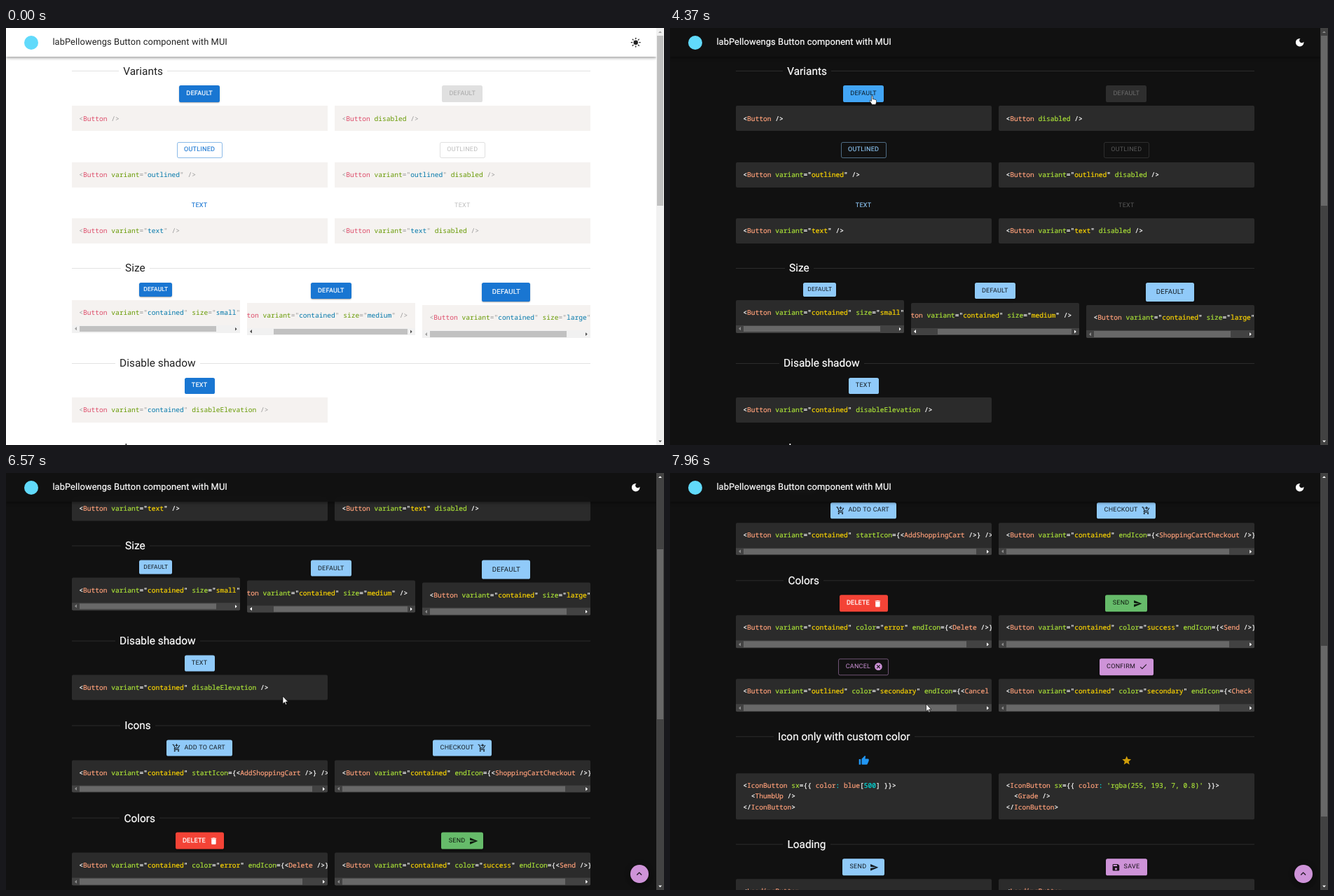
Animation of 939x596 px, one loop 8 s. Source, as an HTML page:

```html
<!DOCTYPE html>
<html lang="en">
<head>
<meta charset="utf-8">
<title>Button component</title>
<style>
html, body { margin: 0; width: 100%; height: 100%; overflow: hidden; }
body { position: relative; font-family: Roboto, Arial, sans-serif; text-rendering: geometricPrecision; }
#app {
  --bg: #fff; --fg: rgba(0,0,0,.87); --line: rgba(0,0,0,.115); --code: #f5f2f0; --head: #fff;
  --p: #999; --t: #dd4a68; --a: #690; --v: #07a; --radius: 0;
  position: absolute; inset: 0; overflow: hidden; background: var(--bg); color: var(--fg);
}
#app.dark {
  --bg: #111; --fg: #fff; --line: rgba(255,255,255,.115); --code: #2b2b2b; --head: rgba(17,17,17,.94);
  --p: #fefefe; --t: #ffa07a; --a: #abe338; --v: #ffd700; --radius: 2px;
  -webkit-text-stroke: .2px;
}
.bars { --track: #f1f1f1; --thumb: #c1c1c1; --on: #505050; --off: #a3a3a3; --hover: #a8a8a8; }
.bars.dim { --track: #424242; --thumb: #686868; --on: #fff; --off: #8b8b8b; --hover: #7b7b7b; }
#page, #page > *, .code > *, .bar > *, header, header > *, #side, #side > *, #fab, #cursor { position: absolute; }
#page { inset: 0; }
svg { display: block; fill: currentColor; flex: none; overflow: visible; }

header {
  left: 0; top: 0; width: 928px; height: 41px; background: var(--head); backdrop-filter: blur(5px);
  box-shadow: 0 1.3px 2.6px -.6px rgba(0,0,0,.2), 0 2.6px 3.2px rgba(0,0,0,.14), 0 .6px 6.4px rgba(0,0,0,.12);
}
.logo { left: 26px; top: 11px; width: 20px; height: 20px; border-radius: 50%; background: #61dafb; }
h1 { margin: 0; left: 66.4px; top: 0; font: 400 12.85px/41px Roboto, Arial, sans-serif; letter-spacing: .0075em; white-space: nowrap; }
#mode { left: 891.3px; top: 12.7px; }
#ripple { left: 886px; top: 7.6px; width: 26px; height: 26px; border-radius: 50%; background: #000; }

.head { left: 94px; width: 740px; height: 20px; display: flex; align-items: center; font-size: 15.42px; white-space: nowrap; }
.head::before, .head::after { content: ""; height: 1px; background: var(--line); width: 10%; }
.head::after { width: 90%; }
.head span { padding: 0 6.2px; }

.code { background: var(--code); border-radius: var(--radius); overflow: hidden; }
pre { margin: 0; top: 10.3px; font: 9.58px/15.4px "Noto Sans Mono", "DejaVu Sans Mono", monospace; color: var(--t); }
.p { color: var(--p); } .a, .s { color: var(--a); } .v { color: var(--v); } .n { color: #00e0e0; }
.bar { left: 0; bottom: 0; width: 100%; height: 10.9px; background: var(--track); }
.thumb { background: var(--thumb); }
.bar .thumb { top: 1.3px; height: 8.3px; }
.thumb.hot { background: var(--hover); }
.arrow { width: 3px; height: 5.4px; background: var(--on); clip-path: polygon(0 0, 100% 50%, 0 100%); }
.arrow.off { background: var(--off); }

.btn { box-sizing: border-box; display: flex; align-items: center; justify-content: center; border-radius: 2.6px;
  letter-spacing: .02857em; white-space: nowrap; -webkit-text-stroke: 0; }
.btn svg { margin: 0 -2.6px 0 5.1px; }
.btn svg:first-child { margin: 0 5.1px 0 -2.6px; }
.up { box-shadow: 0 1.9px .6px -1.3px rgba(0,0,0,.2), 0 1.3px 1.3px rgba(0,0,0,.14), 0 .6px 3.2px rgba(0,0,0,.12); }
.pri { background: var(--pri); color: var(--ink); -webkit-text-stroke: var(--bold); }
.hov { background: var(--priHover); }
.out { border: 1px solid var(--edge); color: var(--pri); background: var(--outHover); }
.txt { color: var(--pri); }
.out, .txt { -webkit-text-stroke: .12px; }
.dis { color: var(--disInk); }
.disBg { background: var(--disBg); }
.disEdge { border: 1px solid var(--disBg); }
.err { background: #f44336; color: #fff; -webkit-text-stroke: .25px; }
.suc { background: #66bb6a; color: rgba(0,0,0,.87); }
.sec { background: #ce93d8; color: rgba(0,0,0,.87); }
.outSec { border: 1px solid rgba(206,147,216,.5); color: #ce93d8; }

#side { right: 0; top: 0; width: 11px; height: 596px; background: var(--track); }
#side .thumb { left: 1.3px; width: 8.6px; height: 243.5px; }
#side .arrow { left: 4px; }
#fab { left: 891.2px; top: 560px; width: 25.7px; height: 25.7px; border-radius: 50%; background: #ce93d8; color: rgba(0,0,0,.87);
  display: flex; align-items: center; justify-content: center;
  box-shadow: 0 1.9px 3.2px -.6px rgba(0,0,0,.2), 0 3.9px 6.4px rgba(0,0,0,.14), 0 .6px 11px rgba(0,0,0,.12); }
#cursor { left: 0; top: 0; }
#cursor path { fill: #fff; stroke: #000; }
</style>
</head>
<body>
<div id="app">
  <div id="page" class="bars"></div>
  <header>
    <div class="logo"></div>
    <h1>labPellowengs Button component with MUI</h1>
    <div id="ripple"></div>
    <div id="mode"></div>
  </header>
  <div id="fab"></div>
  <div id="side" class="bars">
    <div class="arrow" id="upArrow" style="top:3px;transform:rotate(-90deg)"></div>
    <div class="thumb" id="sideThumb"></div>
    <div class="arrow" style="top:587.6px;transform:rotate(90deg)"></div>
  </div>
  <svg id="cursor" width="20" height="20"><path/></svg>
</div>
<script>
const $ = id => document.getElementById(id);
const app = $('app'), page = $('page'), side = $('side');
const LOOP = 8000, CHAR = 5.75, PAD = 10.3, BAR = 10.9, NOTCH = 64.3;

const cart = 'M7 18a2 2 0 100 4 2 2 0 000-4zm10 0a2 2 0 100 4 2 2 0 000-4zm-9.83-3.25l.03-.12.9-1.63h7.45c.75 0 1.41-.41 1.75-1.03l3.86-7.01L19.42 4h-.01l-1.1 2-2.76 5H8.53L6.16 6 4.27 2H1v2h2l3.6 7.59-1.35 2.45C4.5 15.4 5.5 17 7 17h12v-2H7.42c-.13 0-.25-.11-.25-.25z';
const ICONS = {
  add: 'M11 9h2V6h3V4h-3V1h-2v3H8v2h3z' + cart,
  checkout: 'M8 4h5.17l-1.59-1.59L13 1l4 4-4 4-1.41-1.41L13.17 6H8z' + cart,
  bin: 'M6 19c0 1.1.9 2 2 2h8c1.1 0 2-.9 2-2V7H6zM19 4h-3.5l-1-1h-5l-1 1H5v2h14z',
  send: 'M2.01 21L23 12 2.01 3 2 10l15 2-15 2z',
  cancel: 'M12 2a10 10 0 100 20 10 10 0 000-20zm5 13.59L15.59 17 12 13.41 8.41 17 7 15.59 10.59 12 7 8.41 8.41 7 12 10.59 15.59 7 17 8.41 13.41 12z',
  check: 'M9 16.17L4.83 12l-1.42 1.41L9 19 21 7l-1.41-1.41z',
  like: 'M1 21h4V9H1zm22-11c0-1.1-.9-2-2-2h-6.31l.95-4.57.03-.32c0-.41-.17-.79-.44-1.06L14.17 1 7.59 7.59C7.22 7.95 7 8.45 7 9v10c0 1.1.9 2 2 2h9c.83 0 1.54-.5 1.84-1.22l3.02-7.05c.09-.23.14-.47.14-.73z',
  star: 'M12 17.27L18.18 21l-1.64-7.03L22 9.24l-7.19-.61L12 2 9.19 8.63 2 9.24l5.46 4.73L5.82 21z',
  save: 'M17 3H5a2 2 0 00-2 2v14a2 2 0 002 2h14a2 2 0 002-2V7zm-5 16a3 3 0 110-6 3 3 0 010 6zm3-10H5V5h10z',
  up: 'M7.41 15.41L12 10.83l4.59 4.58L18 14l-6-6-6 6z',
  moon: 'M12 3a9 9 0 109 9c0-.46-.04-.92-.1-1.36A5.4 5.4 0 1113.36 3.1C12.92 3.04 12.46 3 12 3z',
  sun: 'M12 7a5 5 0 100 10 5 5 0 000-10z'
};
const icon = (name, size, extra = '') =>
  `<svg width="${size}" height="${size}" viewBox="0 0 24 24"><path d="${ICONS[name]}"/>${extra}</svg>`;
const rays = [...Array(8)].map((_, i) =>
  `<rect x="11" y="1" width="2" height="4" rx="1" transform="rotate(${i * 45} 12 12)"/>`).join('');

const put = (cls, x, y, w, h, html, style = '') => page.insertAdjacentHTML('beforeend',
  `<div class="${cls}" style="left:${x}px;top:${y}px;width:${w}px;height:${h}px;${style}">${html}</div>`);

const heading = (y, text) => page.insertAdjacentHTML('beforeend',
  `<div class="head" style="top:${y - 10}px"><span>${text}</span></div>`);

function button(cx, y, w, label, cls, name, first, h = 23.5, size = 9) {
  const pic = name ? icon(name, 12.84) : '', text = `<span>${label}</span>`;
  put('btn ' + cls, cx - w / 2, y, w, h, first ? pic + text : text + pic, `font-size:${size}px`);
}

const esc = s => s.replace(/</g, '&lt;').replace(/>/g, '&gt;');
const span = (cls, s) => `<span class="${cls}">${esc(s)}</span>`;
function paint(code) {
  return code.replace(/"([^"]*)"|'[^']*'|[<>{}[\]=\/]+|\d+|:|\w+/g, (s, value, at) => {
    if (value) return span('p', '"') + span('v', value) + span('p', '"');
    if (s[0] === "'") return span('s', s);
    if (/^[\d:]/.test(s)) return span('n', s);
    if (!/\w/.test(s)) return span('p', s);
    return code[at + s.length] === '=' || s.startsWith('disable') ? span('a', s) : s;
  });
}

const thumbs = [];
function code(x, y, w, text, toEnd) {
  const lines = text.split('\n');
  const full = Math.max(...lines.map(l => l.length)) * CHAR + 2 * PAD;
  const over = full > w + 1, h = lines.length * 15.4 + 20.6;
  let shift = 0, bar = '';
  if (over) {
    const track = w - 2 * BAR, len = track * w / full, left = BAR + (toEnd ? track - len : 0);
    if (toEnd) shift = full - w;
    bar = `<div class="bar">
      <div class="arrow ${toEnd ? '' : 'off'}" style="left:4px;top:2.8px;transform:scaleX(-1)"></div>
      <div class="thumb" style="left:${left}px;width:${len}px"></div>
      <div class="arrow" style="right:4px;top:2.8px"></div></div>`;
    thumbs.push({ x: x + left, y: y + h + 1.3, w: len });
  }
  put('code', x, y, w, h + (over ? BAR : 0), `<pre style="left:${PAD - shift}px">${paint(text)}</pre>${bar}`);
  if (over) thumbs[thumbs.length - 1].el = page.lastElementChild.querySelector('.thumb');
}
const tag = rest => `<Button ${rest}/>`;
const L = 94, R = 469.2, W = 365, CL = 276.1, CR = 651.3;
const pair = (y, a, b) => { code(L, y, W, a); code(R, y, W, b); };

heading(61.7, 'Variants');
[['DEFAULT', 'pri up hov', 'dis disBg', 58.4, ''],
 ['OUTLINED', 'out', 'dis disEdge', 65, 'variant="outlined" '],
 ['TEXT', 'txt', 'dis', 43, 'variant="text" ']].forEach(([label, on, off, w, attr], i) => {
  const y = 82.3 + i * 80.2;
  button(CL, y, w, label, on);
  button(CR, y, w, label, off);
  pair(y + 29, tag(attr), tag(attr + 'disabled '));
});

heading(343.4, 'Size');
[['small', 47.4, 19.7, 8.35], ['medium', 58.4, 23.5, 9], ['large', 69, 27.1, 9.63]].forEach(([size, w, h, font], i) => {
  const x = L + i * 250.1;
  button(x + 119.7, 363.9, w, 'DEFAULT', 'pri up', '', false, h, font);
  code(x, 369 + h, 239.6, tag(`variant="contained" size="${size}" `), size === 'medium');
});

heading(479.2, 'Disable shadow');
button(CL, 499.5, 43, 'TEXT', 'pri');
code(L, 528.2, W, tag('variant="contained" disableElevation '));

heading(600.2, 'Icons');
button(CL, 620.5, 94.3, 'ADD TO CART', 'pri up', 'add', true);
button(CR, 620.5, 84.3, 'CHECKOUT', 'pri up', 'checkout');
pair(649.6, tag('variant="contained" startIcon={<AddShoppingCart />} '), tag('variant="contained" endIcon={<ShoppingCartCheckout />} '));

heading(732.7, 'Colors');
const colored = (kind, color, name) => tag(`variant="${kind}" color="${color}" endIcon={<${name} />} `);
button(CL, 753.3, 69, 'DELETE', 'err up', 'bin');
button(CR, 753.3, 60, 'SEND', 'suc up', 'send');
pair(782.2, colored('contained', 'error', 'Delete'), colored('contained', 'success', 'Send'));
button(CL, 844, 72, 'CANCEL', 'outSec', 'cancel');
button(CR, 844, 77, 'CONFIRM', 'sec up', 'check');
pair(873.2, colored('outlined', 'secondary', 'Cancel'), colored('contained', 'secondary', 'Check'));

heading(955.7, 'Icon only with custom color');
put('', CL - 7.3, 981.7, 16, 16, icon('like', 15.4), 'color:#2196f3');
put('', CR - 7.3, 981.7, 16, 16, icon('star', 15.4), 'color:rgba(255,193,7,.8)');
const iconButton = (color, child) => `<IconButton sx={{ color: ${color} }}>\n  <${child} />\n</IconButton>`;
pair(1007.6, iconButton('blue[500]', 'ThumbUp'), iconButton("'rgba(255, 193, 7, 0.8)'", 'Grade'));

heading(1109.9, 'Loading');
button(CL, 1130.3, 60, 'SEND', 'pri up', 'send');
button(CR, 1130.3, 58.6, 'SAVE', 'sec up', 'save', true);
pair(1159, '<LoadingButton', '<LoadingButton');
$('fab').innerHTML = icon('up', 15.4);

// time, x, y of the pointer tip
const PATH = [
  [480, 917, 499], [650, 880, 390], [850, 838, 240], [1050, 828, 110], [1230, 858, 42],
  [1430, 884, 28], [1570, 896.5, 19.5], [3500, 896.5, 19.5], [3750, 760, 14], [3950, 520, 80],
  [4130, 300, 109], [4290, 289, 98], [4370, 288.5, 97], [4600, 288, 101], [4760, 284, 112],
  [4900, 282, 166], [5130, 283, 179], [5200, 290, 184], [5560, 400, 300], [5750, 408, 311],
  [6030, 408.5, 313], [6570, 395, 319], [7200, 398, 326], [7620, 399, 328], [7760, 390, 339],
  [7960, 365.5, 330]
];
const NOTCHES = [5600, 5870, 6170, 6450, 6720, 6880, 7010, 7270, 7430];
const ARROW = 'M0 0V16L3.7 12.6 6 18 8.3 17 6 11.8H11Z';
const HAND = 'M6 1.5c0-2 3-2 3 0V8c1-1 2.6-.8 3 .4 1-.8 2.5-.5 2.7.7 1.2-.6 2.5 0 2.5 1.4V14c0 3-1.5 5-2 6H7c-1-2.5-3-5-4.6-7.2C1 10.8 3 9.6 4.4 11L6 12.5Z';

const ramp = (t, start, len) => Math.min(1, Math.max(0, (t - start) / len));
const ease = x => x * x * (3 - 2 * x);
const glide = (t, start, len = 250) => ease(ramp(t, start, len));
const mix = (a, b, k) => a.map((v, i) => v + (b[i] - v) * k);
const css = c => `rgba(${c.map(v => +v.toFixed(3)).join()})`;
const within = ([x, y], l, t, r, b) => x >= l && x <= r && y >= t && y <= b;

function tip(t) {
  const i = PATH.findIndex(p => p[0] > t);
  if (i < 0) return PATH[PATH.length - 1].slice(1);
  const a = PATH[Math.max(0, i - 1)], b = PATH[i];
  return mix(a, b, ramp(t, a[0], b[0] - a[0] || 1)).slice(1);
}

let night = null;
function draw(t) {
  const dark = t >= 2700;
  if (dark !== night) {
    night = dark;
    app.classList.toggle('dark', dark);
    page.classList.toggle('dim', dark);
    $('mode').innerHTML = dark ? icon('moon', 15.4) : icon('sun', 15.4, rays);
  }
  side.classList.toggle('dim', t >= 2510);
  $('ripple').style.opacity = t < 2510 ? 0 : .07 * (1 - ramp(t, 2640, 60));

  const k = glide(t, 2705);
  const over = glide(t, 4110) - glide(t, 4760), overOut = glide(t, 4890) - glide(t, 5190);
  const blue = mix([25, 118, 210, 1], [144, 202, 249, 1], k);
  const set = (name, v) => app.style.setProperty('--' + name, v);
  set('pri', css(blue));
  set('priHover', css(mix(blue, [66, 165, 245, 1], over)));
  set('edge', css([...blue.slice(0, 3), .5 + .5 * overOut]));
  set('outHover', css([144, 202, 249, .08 * overOut]));
  set('ink', css(mix([255, 255, 255, 1], [0, 0, 0, .87], k)));
  set('bold', .2 * (1 - k) + 'px');
  set('disInk', css(mix([0, 0, 0, .26], [255, 255, 255, .3], k)));
  set('disBg', css(mix([0, 0, 0, .12], [255, 255, 255, .12], k)));

  const scroll = NOTCHES.reduce((s, n) => s + NOTCH * glide(t, n, 185), 0);
  page.style.transform = `translateY(${-scroll.toFixed(2)}px)`;
  $('sideThumb').style.top = BAR + scroll * .4085 + 'px';
  $('upArrow').classList.toggle('off', scroll === 0);
  $('fab').style.transform = `scale(${glide(t, 5920, 210)})`;

  const p = tip(t), cursor = $('cursor');
  const hand = within(p, 886, 8, 912, 33) ||
    within(p, 247, 82 - scroll, 305, 106 - scroll) || within(p, 243, 163 - scroll, 309, 186 - scroll);
  cursor.style.display = t < 480 ? 'none' : 'block';
  cursor.style.transform = `translate(${p[0]}px,${p[1]}px)`;
  cursor.firstElementChild.setAttribute('d', hand ? HAND : ARROW);
  cursor.firstElementChild.setAttribute('transform', hand ? 'scale(.62) translate(-7.5 0)' : 'scale(.68)');
  for (const b of thumbs)
    b.el.classList.toggle('hot', t > 5200 && within(p, b.x, b.y - scroll - 1.7, b.x + b.w, b.y - scroll + 10));
}

const start = performance.now();
(function tick() {
  draw((performance.now() - start) % LOOP);
  requestAnimationFrame(tick);
})();
</script>
</body>
</html>
```
